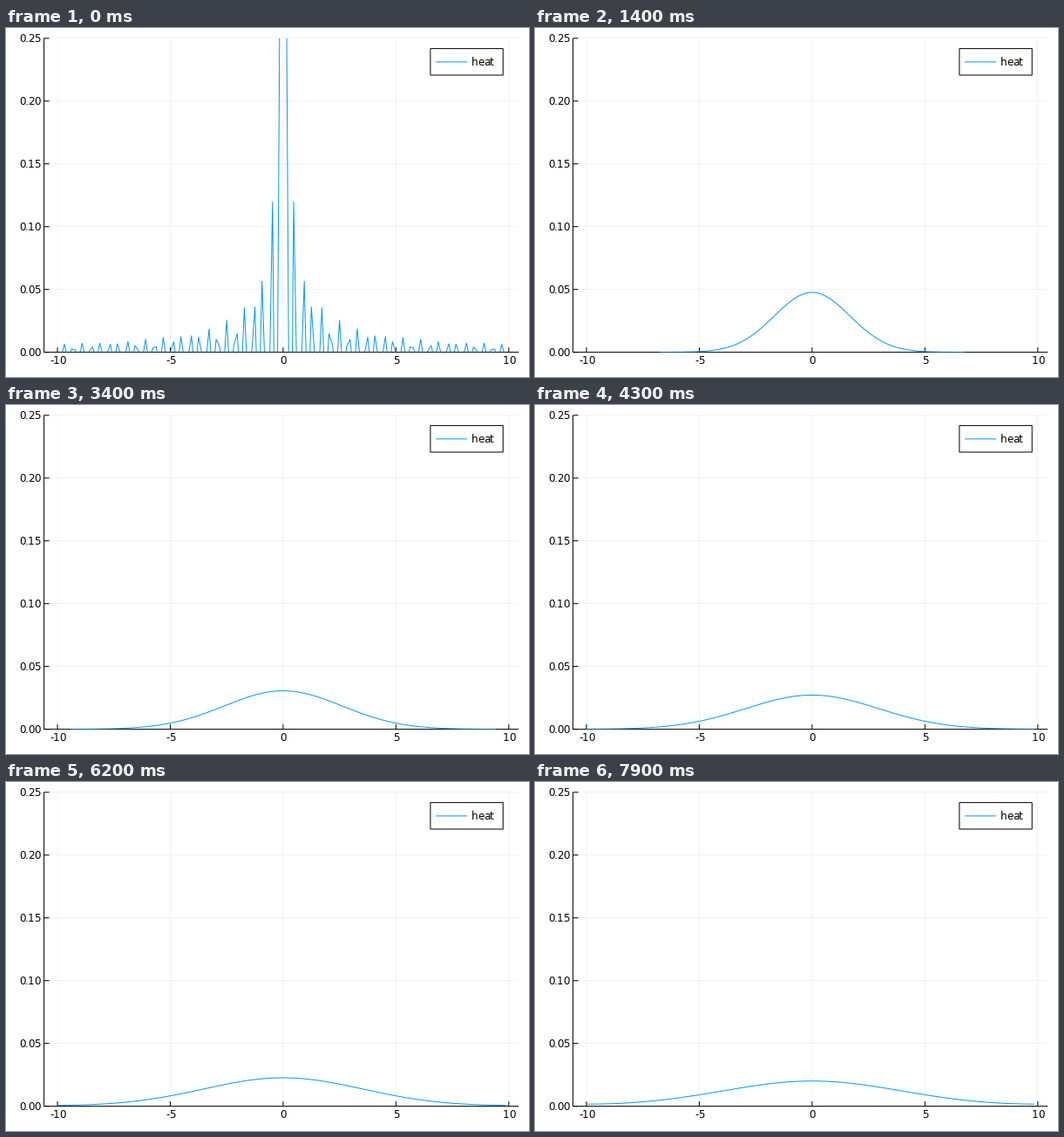
Write a matplotlib script that moves like this. It is 600 px wide and 400 px high and loops after 8000 ms.

```python
import numpy as np
import matplotlib.pyplot as plt
from matplotlib.animation import FuncAnimation
from matplotlib.patches import Polygon, Rectangle
from matplotlib.textpath import text_to_path

W, H, DPI = 600, 400, 100
PX = 72 / DPI
LEFT, RIGHT, TOP, BOTTOM = 43.6, 588.2, 11.8, 371.6
BLUE = "#009AFA"
FONT_PX = 12

# Periodic grid and spectrum of the starting pulse
N, L = 128, 20.0
x = -L / 2 + L / N * np.arange(N)
k = 2 * np.pi * np.fft.fftfreq(N, L / N)
u0_hat = np.fft.fft(np.sinc(5 * x))

pad = 0.03 * (x[-1] - x[0])
X0, X1, Y1 = x[0] - pad, x[-1] + pad, 0.25


def px(v):
    return LEFT + (v - X0) / (X1 - X0) * (RIGHT - LEFT)


def py(v):
    return BOTTOM - v / Y1 * (BOTTOM - TOP)


def heat(t):
    return np.fft.ifft(u0_hat * np.exp(-k**2 * t)).real


def visible(u):
    """Cut the curve where it goes below zero."""
    i = np.nonzero(u[:-1] * u[1:] < 0)[0]
    cross = x[i] - u[i] * (x[i + 1] - x[i]) / (u[i + 1] - u[i])
    xs = np.concatenate([x, cross])
    us = np.concatenate([u, np.zeros(len(cross))])
    order = np.argsort(xs)
    xs, us = xs[order], us[order]
    return px(xs), py(np.where(us < 0, np.nan, us))


plt.rcParams["font.family"] = "DejaVu Sans"
fig = plt.figure(figsize=(W / DPI, H / DPI), dpi=DPI, facecolor="white")
ax = fig.add_axes([0, 0, 1, 1])
ax.set_xlim(0, W)
ax.set_ylim(H, 0)
ax.axis("off")
font = ax.text(0, 0, "", fontsize=FONT_PX * PX).get_fontproperties()


def line(xs, ys, color="black", z=2, width=1, **kw):
    return ax.plot(xs, ys, color=color, lw=width * PX, zorder=z, snap=False,
                   solid_capstyle="butt", **kw)[0]


def text_width(s):
    return text_to_path.get_text_width_height_descent(s, font, False)[0] / PX


def advance(ch):
    """Pen advance of one glyph, cut to whole pixels."""
    return int(text_width(f"|{ch}|") - text_width("||"))


def label(tx, ty, s, align=0.0):
    steps = [advance(ch) for ch in s]
    pen = round(tx - align * sum(steps))
    for ch, step in zip(s, steps):
        ax.text(pen, ty, ch, fontproperties=font, va="baseline", zorder=6)
        pen += step


for v in range(-10, 11, 5):
    line([px(v)] * 2, [TOP, BOTTOM], z=1, width=0.5, alpha=0.1)
    line([px(v)] * 2, [BOTTOM, BOTTOM - 5.5])
    label(px(v), 385, str(v), 0.5)

for v in np.arange(6) * 0.05:
    line([LEFT, RIGHT], [py(v)] * 2, z=1, width=0.5, alpha=0.1)
    line([LEFT, LEFT + 6], [py(v)] * 2)
    label(38.8, py(v) + 4.2, f"{v:.2f}", 1)

line([LEFT, LEFT], [TOP, BOTTOM])
line([LEFT, RIGHT], [BOTTOM, BOTTOM])

curve = line([], [], BLUE, z=3, solid_joinstyle="round")
frame = Polygon([(LEFT, TOP), (RIGHT, TOP), (RIGHT, BOTTOM), (LEFT, BOTTOM)],
                transform=ax.transData)
curve.set_clip_path(frame)

ax.add_patch(Rectangle((486.9, 23.6), 83.3, 30.4, fc="white", ec="black",
                       lw=PX, zorder=4, snap=False))
line([493, 529], [38.9, 38.9], BLUE, z=5)
label(533.7, 43, "heat")


def update(i):
    curve.set_data(*visible(heat(i * 0.1)))
    return (curve,)


anim = FuncAnimation(fig, update, frames=80, interval=100, repeat=True,
                     repeat_delay=0, blit=False)
plt.show()
```
